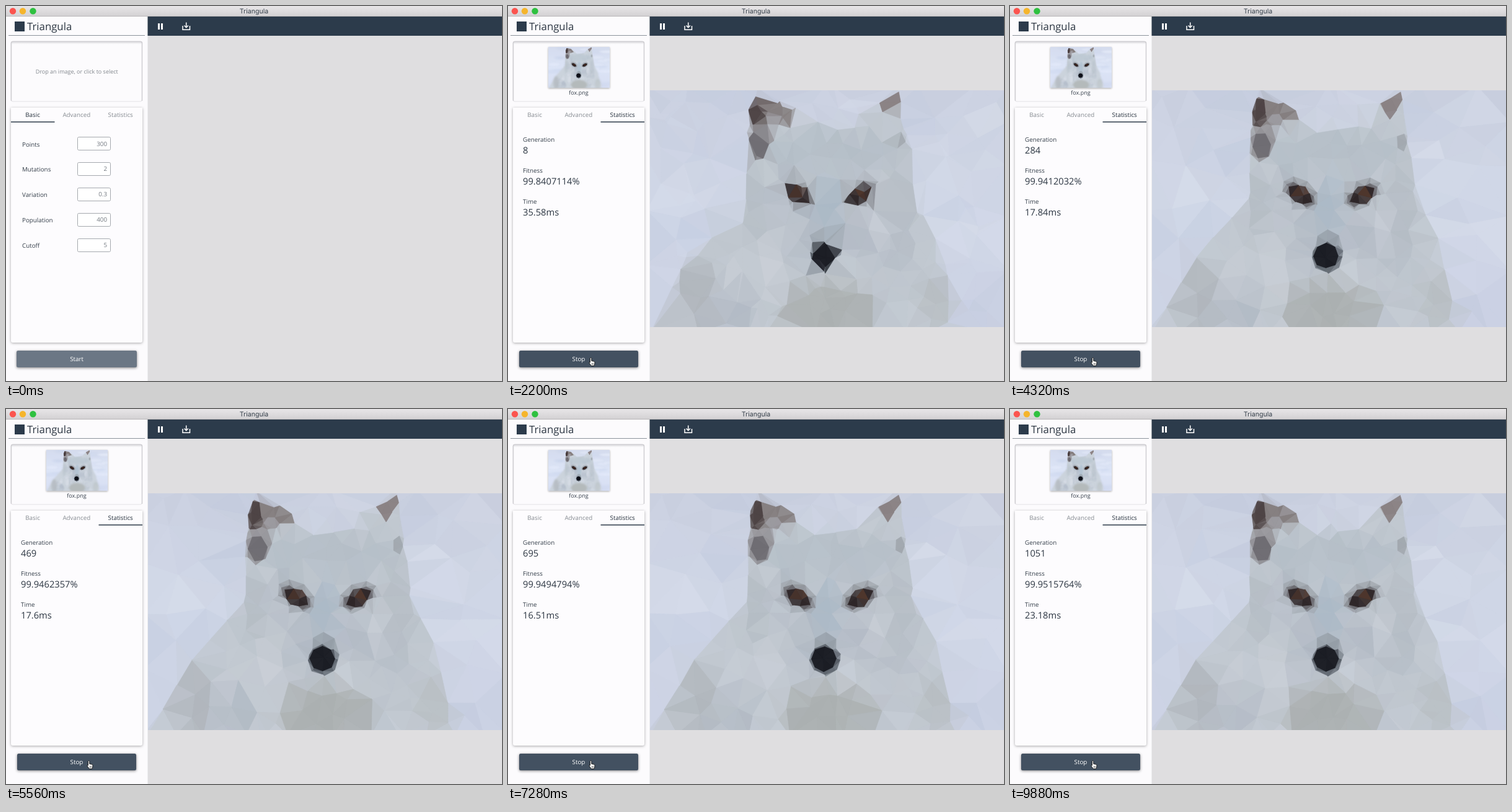
Animation, 800 px wide and 605 px high, one loop 9920 ms. Source, as an HTML page with a canvas:

```html
<!DOCTYPE html>
<html lang="en">
<head>
<meta charset="utf-8">
<title>Triangula</title>
<style>
  html, body { margin: 0; width: 100%; height: 100%; overflow: hidden; background: #dfdee0; }
  svg, canvas { position: absolute; left: 0; top: 0; display: block; }
  #art { left: 229px; top: 136px; }
  #thumb { left: 64.5px; top: 65.5px; width: 99px; height: 66px; box-shadow: 0 1px 3px #0005; filter: contrast(1.15); }
  text { font: 9.8px "Open Sans", sans-serif; fill: #353f4a; text-rendering: geometricPrecision; }
  .mid { text-anchor: middle; }
  .num { text-anchor: end; fill: #737980; }
  .tab { text-anchor: middle; fill: #868b91; }
  .tab.on { fill: #27323e; }
  .stat { font-size: 14.7px; fill: #2c3642; }
  .small { font-size: 9px; text-anchor: middle; }
  .field { fill: #fff; stroke: #a5a9ae; }
  .card { fill: #fdfcfe; filter: drop-shadow(0 1px 2px #0005); }
  #button { filter: drop-shadow(0 1px 2px #0007); }
  #label { fill: #fff; font-weight: 500; }
  .hide { visibility: hidden; }
</style>
</head>
<body>
<svg width="800" height="605">
  <defs>
    <linearGradient id="bar" x2="0" y2="1"><stop stop-color="#e8e6e8"/><stop offset="1" stop-color="#d2d0d2"/></linearGradient>
    <linearGradient id="well" x2="0" y2="1"><stop stop-color="#d9d9dc"/><stop offset=".05" stop-color="#fcfbfd"/></linearGradient>
  </defs>
  <rect width="800" height="605" fill="#dfdee0"/>
  <rect y="17" width="228.5" height="588" fill="#fcfbfd"/>
  <rect x="228.5" y="17" width="572" height="31" fill="#2c3b4b"/>
  <rect width="800" height="17" fill="url(#bar)"/>
  <path d="M0 16.5H800" stroke="#b9b7b9"/>
  <circle cx="11" cy="8.2" r="5.2" fill="#fb544f"/>
  <circle cx="27" cy="8.2" r="5.2" fill="#f5b52c"/>
  <circle cx="43.5" cy="8.2" r="5.2" fill="#2fc140"/>
  <text x="400" y="12" class="mid" style="font:10.6px Inter,sans-serif">Triangula</text>

  <rect x="14" y="25" width="16" height="16" fill="#2c3b4b"/>
  <text x="34" y="38.8" style="font-size:16.8px;fill:#2c3642">Triangula</text>
  <path d="M4 47.5H224" stroke="#8d949c"/>

  <path d="M245 28h3v10h-3zM250 28h3v10h-3z" fill="#fff"/>
  <path d="M285 32v6.3h11.5V32M290.7 26.5v8M287.5 31.5l3.2 3.2 3.2-3.2" fill="none" stroke="#fff" stroke-width="1.5"/>

  <rect x="8" y="57" width="211.5" height="97" rx="3" fill="url(#well)" stroke="#e3e2e5"/>
  <path d="M8.5 153V60q0-2.5 2.5-2.5H217q2.5 0 2.5 2.5V153" fill="none" stroke="#cfced2" stroke-width="1.5"/>
  <text id="hint" x="114.2" y="109" class="small" style="fill:#82878d">Drop an image, or click to select</text>
  <text id="file" x="114" y="143" class="small">fox.png</text>

  <path class="card" d="M8 164H220V540q0 3-3 3H11q-3 0-3-3Z"/>
  <text id="tabBasic" class="tab" x="43" y="179">Basic</text>
  <text class="tab" x="113.8" y="179">Advanced</text>
  <text id="tabStats" class="tab" x="184.7" y="179">Statistics</text>
  <rect id="underline" y="186.3" x="8" width="70.5" height="1.6" fill="#3a4755"/>

  <g id="basic"></g>
  <g id="stats">
    <text x="24" y="219">Generation</text><text id="gen" class="stat" x="24" y="238"></text>
    <text x="24" y="269">Fitness</text><text id="fit" class="stat" x="24" y="288"></text>
    <text x="24" y="319">Time</text><text id="time" class="stat" x="24" y="338"></text>
  </g>

  <rect id="button" y="556" height="27" rx="2.5"/>
  <text id="label" class="mid" x="114" y="573"></text>
</svg>
<canvas id="art" width="571" height="382"></canvas>
<canvas id="thumb" width="571" height="382"></canvas>
<svg width="800" height="605">
  <path id="cursor" d="M3 0q1.2 0 1.2 1.2V5l3.8.8q1.6.4 1.5 2L9 10.5 8.2 13H4L.7 8.7Q0 7.2 1.2 7l.7.6V1.2Q1.9 0 3 0ZM5 9v2M6.8 9v2" fill="#fff" stroke="#111" stroke-width=".9"/>
</svg>
<script>
const LOOP = 9920, STEP = 40;
const LOADED = 480, HOVER = 1000, RUN = 1880;
const X0 = 229, Y0 = 136, W = 571, H = 382;
const $ = id => document.getElementById(id);
const clamp = x => Math.max(0, Math.min(1, x));
const ease = x => { x = clamp(x); return x * x * (3 - 2 * x); };
const mix = (a, b, u) => a + (b - a) * u;
const rnd = n => { const s = Math.sin(n * 127.1 + 11.7) * 43758.5453; return s - Math.floor(s); };
const show = (id, on) => $(id).classList.toggle('hide', !on);

$('basic').innerHTML = Object.entries({ Points: 300, Mutations: 2, Variation: 0.3, Population: 400, Cutoff: 5 })
  .map(([name, value], i) => {
    const y = 222 + i * 40.9;
    return `<text x="26" y="${y + 4.5}">${name}</text>
      <rect class="field" x="115.5" y="${Math.round(y - 11) + .5}" width="53" height="21" rx="2"/>
      <text class="num" x="163" y="${y + 3.5}">${value}</text>`;
  }).join('');

// Soft picture of the fox; the outlines of its parts also seed the mesh.
const photo = $('thumb').getContext('2d', { willReadFrequently: true });
const art = $('art').getContext('2d');
photo.translate(-X0, -Y0);
art.translate(-X0, -Y0);
const points = [];
const addPoint = (x, y, wander, settle = 0) => points.push({ x, y, wander, settle });

const poly = s => s.split(' ').map(p => p.split(',').map(Number));
const oval = (x, y, rx, ry, turn = 0, n = 8) => Array.from({ length: n }, (_, i) => {
  const a = i * 2 * Math.PI / n, u = rx * Math.cos(a), v = ry * Math.sin(a);
  return [x + u * Math.cos(turn) - v * Math.sin(turn), y + u * Math.sin(turn) + v * Math.cos(turn)];
});

// Every second mesh point is found late, so early outlines are coarse.
function part(color, blur, pts, step = 30) {
  photo.filter = `blur(${blur}px)`;
  photo.fillStyle = color;
  photo.beginPath();
  pts.forEach(p => photo.lineTo(...p));
  photo.fill();
  pts.forEach(([x, y], i) => {
    const [x2, y2] = pts[(i + 1) % pts.length];
    const n = Math.max(1, Math.round(Math.hypot(x2 - x, y2 - y) / step));
    for (let k = 0; k < n; k++)
      addPoint(mix(x, x2, k / n), mix(y, y2, k / n), 2, (i + k) % 2 ? 10 + 160 * rnd(x + y + k) : 0);
  });
}
function blot(color, x, y, rx, ry, blur = 9) {
  photo.filter = `blur(${blur}px)`;
  photo.fillStyle = color;
  photo.beginPath();
  photo.ellipse(x, y, rx, ry, 0, 0, 7);
  photo.fill();
}

function drawFox() {
  const sky = photo.createLinearGradient(0, Y0, 0, Y0 + H);
  ['#cad0e0', '#d0d7e7', '#ccd2e4'].forEach((c, i) => sky.addColorStop(i / 2, c));
  photo.fillStyle = sky;
  photo.fillRect(X0, Y0, W, H);
  for (let i = 0; i < 30; i++)
    blot(i % 2 ? '#b9c3dc40' : '#dde1ec60', X0 + W * rnd(i), Y0 + H * rnd(i + 50), 40 + 60 * rnd(i + 90), 8 + 10 * rnd(i + 130), 7);

  const fur = '#c1c8d0';
  part(fur, 7, poly('229,525 300,405 385,310 650,300 690,375 724,525'), 45);
  part(fur, 2, poly('388,330 386,238 391,165 402,147 462,168 495,204 562,194 597,158 630,138 647,245 658,330'), 36);
  for (let i = 0; i < 100; i++) {
    const y = 205 + 310 * rnd(i + 350), spread = 210 + Math.max(0, y - 300) * .9;
    blot(i % 2 ? '#a3afba38' : '#d3d8de40', 515 + (rnd(i + 200) - .5) * spread, y, 6 + 18 * rnd(i + 500), 14 + 28 * rnd(i + 650), 5);
  }
  blot('#b2bdc6c0', 520, 235, 115, 36, 12);
  blot('#acbac7', 516, 325, 20, 55);
  blot('#adb2b3', 515, 490, 75, 45);
  blot('#a7acb2a0', 302, 470, 26, 60);
  blot('#b0b8bfb0', 396, 320, 12, 60);
  blot('#b0b8bfa0', 632, 325, 18, 70);
  blot('#b3b9bda0', 690, 480, 25, 45);

  // ears
  part('#9a999e', 2, oval(408, 215, 21, 37, .15));
  part('#857f80', 1.5, poly('391,190 401,146 441,155 466,184 436,193'));
  part('#9d9ca1', 2, oval(428, 184, 13, 11, 0, 6));
  part('#4f4546', 1.5, oval(401, 172, 11, 26, .1, 6));
  part('#6f6d73', 2, oval(406, 225, 15, 22, -.1, 6));
  part('#8b8385', 1.5, poly('597,158 630,139 634,151 612,184'), 20);
  part('#a2a8af', 2, oval(632, 220, 9, 15, 0, 5));
  // eyes
  for (const [x, y, turn] of [[468, 304, .6], [568, 305, -.5]]) {
    part('#a0a6ad', 3, oval(x, y - 3, 34, 22, turn));
    part('#74747a', 1.5, oval(x, y, 28, 15, turn));
    part('#30282a', 1, oval(x, y, 23, 12, turn, 6));
    blot('#53382d', x + 2, y - 2, 10, 6, 1);
  }
  // nose
  part('#9aa3ac', 3, oval(513, 396, 25, 36));
  part('#636a73', 1.5, oval(511, 405, 25, 25));
  part('#1c1e25', 1, oval(510, 403, 20, 20));
  addPoint(511, 404, 8);
  photo.filter = 'none';
}

function fillMesh() {
  for (const x of [-12, W + 12]) for (const y of [-12, H + 12]) addPoint(X0 + x, Y0 + y, 1);
  for (let i = 1; i < 9; i++) {
    const out = 4 + 3 * rnd(i), x = X0 + W * (i + rnd(i + 20) - .5) / 9, y = Y0 + H * (i + rnd(i + 40) - .5) / 9;
    addPoint(x, Y0 - out, 1);
    addPoint(x + 17, Y0 + H + out, 1);
    if (i % 2) { addPoint(X0 - out, y, 1); addPoint(X0 + W + out, y + 9, 1); }
  }
  for (let i = 0; points.length < 300 && i < 3000; i++) {
    const x = X0 + 10 + (W - 20) * rnd(i * 2 + 900.3), y = Y0 + 10 + (H - 20) * rnd(i * 2 + 901.3);
    const onFox = Math.abs(x - 510) < 130 + Math.max(0, y - 320) * .6;
    const gap = onFox ? 20 : 38;
    if (points.every(p => Math.hypot(p.x - x, p.y - y) > gap)) addPoint(x, y, onFox ? 12 : 20);
  }
}

// Points jump to a new place now and then, and settle as the generations pass.
function place(p, i, gen) {
  if (gen < p.settle) return [X0 + 12 + (W - 24) * rnd(i + .3), Y0 + 12 + (H - 24) * rnd(i + .7)];
  const k = Math.floor(gen / 170 + rnd(i + .5));
  const reach = p.wander * (k < 1 && p.wander === 2 ? 4 : 1);
  return [p.x + (rnd(i * 31 + k) - .5) * reach, p.y + (rnd(i * 37 + k + .4) - .5) * reach];
}

function delaunay(list) {
  const n = list.length, pts = [...list, [-1e5, -1e5], [1e5, -1e5], [0, 2e5]];
  const circle = (...v) => {
    const [[ax, ay], [bx, by], [cx, cy]] = v.map(i => pts[i]);
    const ux = bx - ax, uy = by - ay, vx = cx - ax, vy = cy - ay;
    const d = 2 * (ux * vy - uy * vx), u = ux * ux + uy * uy, w = vx * vx + vy * vy;
    const x = (vy * u - uy * w) / d, y = (ux * w - vx * u) / d;
    return { v, x: ax + x, y: ay + y, r: x * x + y * y };
  };
  let tris = [circle(n, n + 1, n + 2)];
  list.forEach(([x, y], i) => {
    const edges = new Map();
    tris = tris.filter(t => {
      if ((t.x - x) ** 2 + (t.y - y) ** 2 >= t.r) return true;
      t.v.forEach((a, j) => {
        const b = t.v[(j + 1) % 3], key = Math.min(a, b) * 1000 + Math.max(a, b);
        if (!edges.delete(key)) edges.set(key, [a, b]);
      });
      return false;
    });
    edges.forEach(([a, b]) => tris.push(circle(a, b, i)));
  });
  return tris.map(t => t.v).filter(v => v.every(i => i < n));
}

drawFox();
fillMesh();
const pixels = photo.getImageData(0, 0, W, H).data;

// Mean colour of a triangle, sampled on a small barycentric grid.
function tint(tri, seed) {
  const sum = [0, 0, 0], n = 5;
  let count = 0;
  for (let a = 1; a < n; a++) for (let b = 1; a + b < n; b++, count++) {
    const at = k => (a * tri[0][k] + b * tri[1][k] + (n - a - b) * tri[2][k]) / n;
    const x = Math.max(0, Math.min(W - 1, Math.floor(at(0) - X0)));
    const y = Math.max(0, Math.min(H - 1, Math.floor(at(1) - Y0)));
    for (let c = 0; c < 3; c++) sum[c] += pixels[(y * W + x) * 4 + c];
  }
  const grain = (rnd(seed) - .5) * 4;
  return `rgb(${sum.map(s => Math.round(s / count + grain))})`;
}

function drawMesh(gen) {
  const pts = points.map((p, i) => place(p, i, gen));
  art.lineWidth = .7;
  for (const v of delaunay(pts)) {
    const tri = v.map(i => pts[i]);
    art.fillStyle = art.strokeStyle = tint(tri, v[0] + v[1] + v[2]);
    art.beginPath();
    tri.forEach(p => art.lineTo(...p));
    art.closePath();
    art.fill();
    art.stroke();
  }
}

// time, generation, fitness, ms per generation
const RUNS = [
  [1880, 0, 99.79, 36.2], [2200, 8, 99.8407114, 35.58], [4320, 284, 99.9412032, 17.84],
  [5560, 469, 99.9462357, 17.6], [7280, 695, 99.9494794, 16.51], [9880, 1051, 99.9515764, 23.18]
];
function progress(t) {
  const i = Math.max(1, RUNS.findIndex(r => t <= r[0]));
  const a = RUNS[i - 1], b = RUNS[i], u = (t - a[0]) / (b[0] - a[0]);
  const gen = Math.floor(mix(a[1], b[1], u) + 1e-6);
  const v = Math.log((gen + 1) / (a[1] + 1)) / Math.log((b[1] + 1) / (a[1] + 1));
  const wobble = (rnd(gen + .2) - .35) * 5 * Math.min(1, 8 * u * (1 - u));
  return { gen, fit: mix(a[2], b[2], v), ms: mix(a[3], b[3], Math.sqrt(u)) + wobble };
}

function render(t) {
  const loaded = t >= LOADED, running = t >= RUN;
  show('hint', !loaded);
  show('file', loaded);
  show('thumb', loaded);
  show('cursor', loaded);
  show('basic', !running);
  show('stats', running);
  show('art', running);
  $('tabBasic').classList.toggle('on', !running);
  $('tabStats').classList.toggle('on', running);
  $('underline').setAttribute('x', mix(8, 149.5, ease((t - RUN) / 200)));

  const move = ease((t - 560) / 480), hover = clamp((t - HOVER) / 160), inset = running ? 1 : 0;
  $('cursor').setAttribute('transform', `translate(${mix(118, 130.5, move)} ${mix(104, 567.5, move)})`);
  $('button').setAttribute('fill', `rgb(${mix(107, 67, hover)},${mix(119, 81, hover)},${mix(133, 97, hover)})`);
  $('button').setAttribute('x', 17 + inset);
  $('button').setAttribute('width', 194 - 2 * inset);
  $('label').textContent = running ? 'Stop' : 'Start';

  if (!running) return;
  const { gen, fit, ms } = progress(t);
  $('gen').textContent = gen;
  $('fit').textContent = fit.toFixed(7) + '%';
  $('time').textContent = +ms.toFixed(2) + 'ms';
  drawMesh(gen);
}

let last = -1;
function tick() {
  const t = Math.floor(performance.now() % LOOP / STEP) * STEP;
  if (t !== last) render(last = t);
  requestAnimationFrame(tick);
}
tick();
</script>
</body>
</html>
```
